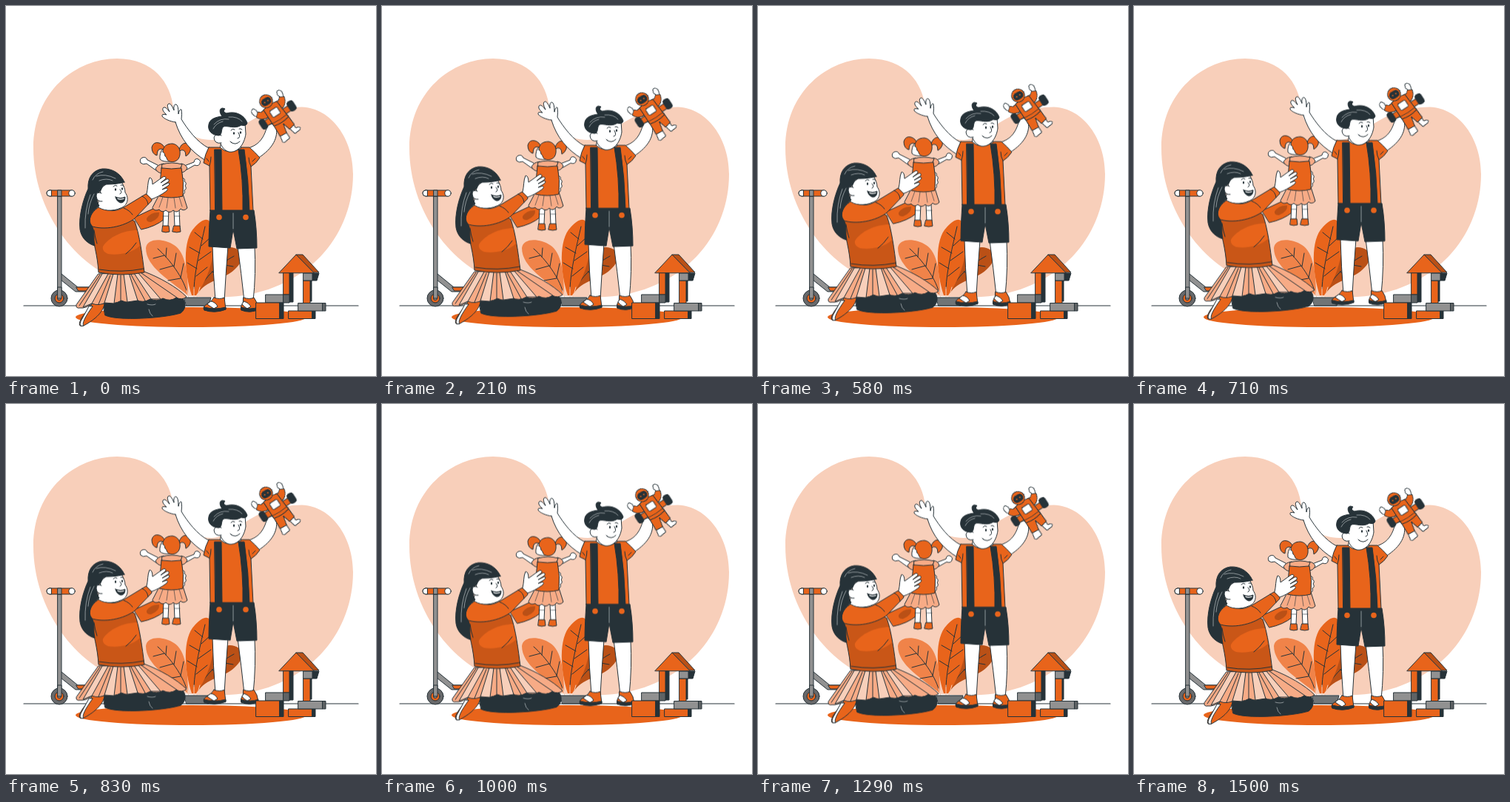
Animation, 500 px wide and 500 px high, one loop 1540 ms. Source, as an HTML page:

```html
<!DOCTYPE html>
<html lang="en">
<head>
<meta charset="utf-8">
<title>Children playing</title>
<style>
  html, body { margin: 0; width: 100%; height: 100%; overflow: hidden; background: #fff; }
  svg { display: block; width: 100vw; height: 100vh; }
  .art { stroke: #263238; stroke-width: 1; stroke-linejoin: round; stroke-linecap: round; fill: none; }
  .o { fill: #e8641b; }
  .s { fill: #ba5016; }
  .t { fill: #c95617; }
  .m { fill: #f08349; }
  .p { fill: #f7ab86; }
  .q { fill: #f8cfba; }
  .w { fill: #fff; }
  .d { fill: #263238; }
  .g { fill: #919191; }
  .n { stroke: none; }
  .k { fill: #263238; stroke: none; }
  .hl { stroke: #d5dadc; stroke-width: .6; }
  /* Linear bob of 10px, held at 24 steps per second */
  .float { animation: float 1540ms -5ms infinite; }
  @keyframes float {
    0% { transform: translateY(0); animation-timing-function: steps(17); }
    45.946% { transform: translateY(-9.4px); animation-timing-function: steps(18); }
    94.595% { transform: translateY(.6px); animation-timing-function: steps(2); }
    100% { transform: translateY(-.5px); }
  }
</style>
</head>
<body>
<svg viewBox="0 0 500 500">
  <path class="q" d="M150 71C199 71 223 104 226 138C229 166 252 181 278 181C312 179 330 137 400 136.500C440 138 469 180 469 227C469 306 414 376 322 391C268 398 210 390 165 375C92 354 37 275 37 192C37 115 95 71 150 71Z"/>

  <g class="art">
    <path d="M24 405H476" stroke-width="1.2"/>
    <ellipse class="o n" cx="250" cy="420.5" rx="156" ry="13.5"/>

    <g id="scooter">
      <path class="g" d="M75 362L97 380H118V386H94L74 370Z"/>
      <path class="o" d="M95 380H120V385H98Z"/>
      <path class="g" d="M70 257H75V388H70Z"/>
      <rect class="o" x="55" y="249" width="38" height="8" rx="4"/>
      <path class="w" d="M61 249H59A4 4 0 0 0 59 257H61Z"/>
      <path class="g" d="M70 249H75V257H70Z"/>
      <circle class="w" cx="89" cy="253" r="4.2"/>
      <circle cx="72" cy="395" r="11" fill="#68696b"/>
      <circle class="o" cx="72" cy="395" r="6"/>
      <circle class="g" cx="72" cy="395" r="2.5"/>
      <path class="g" d="M70 380H75V395H70Z"/>
    </g>

    <g id="plant">
      <path class="m n" d="M246 391C222 371 189 353 189 327C191 313 213 314 227 323C243 333 246 362 246 391Z"/>
      <path d="M205 328C222 343 239 367 244 385M216 339L217 327M227 352L230 334M236 367L240 348M214 337L199 341M226 351L208 356M236 368L219 371"/>
      <path class="s n" d="M259 389C263 355 276 328 302 326C322 327 324 343 309 356C293 371 270 370 259 389Z"/>
      <path d="M308 338C286 350 268 367 261 384M290 349L307 352M278 359L291 366"/>
      <path class="o n" d="M251 391C241 360 238 316 255 299C263 290 271 286 275 291C286 316 282 356 257 391Z"/>
      <path d="M269 298C263 324 255 357 254 382M266 315L255 306M262 334L248 326M258 355L245 347M264 324L276 313M260 344L277 332M257 365L272 353"/>
      <path d="M244 384L247 394M254 380V394M262 380L258 394" stroke="#f8cfba"/>
      <path d="M241 394H277L274 405H244Z" fill="#707476"/>
    </g>
  </g>

  <g class="art float" id="girl">
    <path class="d" d="M131 402C155 395 225 390 239 395C244 401 243 410 236 415C214 422 150 426 134 418Z"/>
    <path class="hl" d="M191 403Q198 405 202 403M193 410Q194 416 198 419"/>
    <path class="o" d="M117 402L133 402C132 412 122 423 105 432C97 435 98 427 104 419Z"/>
    <path class="w" d="M112 406L101 426Q98 434 105 432Q101 428 117 406Z"/>

    <path class="o" d="M173 286L205 271Q216 272 214 288Q202 298 183 302Z"/>
    <path class="s n" d="M190 287Q196 278 207 279Q208 287 196 292Q189 292 190 287Z"/>
    <path class="w" d="M237 232Q243 233 241 237Q245 239 242 243Q245 247 241 249Q243 254 237 256Z"/>

    <g id="doll">
      <path class="w" d="M213 275L212 298H219L220 275ZM227 275L228 298H235L234 275Z"/>
      <path class="o" d="M212 297H220L221 305Q216 307 211 305ZM227 297H235L236 305Q231 307 225 305Z"/>
      <path d="M212 284H219M228 284H235" stroke-width=".6"/>
      <path class="w" d="M205 215L191 208Q189 203 184 205Q180 207 182 212Q185 215 190 213L204 223ZM241 216L254 211Q255 205 260 207Q264 209 262 213Q260 217 255 215L241 223Z"/>
      <path class="p" d="M213 213Q205 214 202 220Q205 226 211 226ZM237 213Q243 214 245 219Q242 225 237 225Z"/>
      <path class="p" d="M208 254L239 254L245 273Q240 278 236 274Q231 281 226 276Q221 281 216 276Q211 280 207 275Q201 278 198 273Z"/>
      <path d="M212 258L207 272M219 259L217 273M227 259L229 273M234 258L238 271" stroke-width=".6"/>
      <path class="o" d="M210 219Q224 216 237 219Q241 237 239 257Q224 261 207 257Q208 238 210 219Z"/>
      <path class="p" d="M211 214Q224 210 238 214L236 219Q224 221 211 219Z"/>
      <path class="w" d="M212 193Q207 199 208 207Q212 211 221 210L219 195Z"/>
      <path class="o" d="M213 194Q204 190 204 202Q197 200 197 191Q199 183 207 185Q213 187 215 193ZM234 194Q236 186 243 185Q251 187 249 196Q247 201 243 203Q243 191 234 196Z"/>
      <path class="o" d="M212 197C212 189 218 186 225 186C232 187 236 193 235 201C234 209 227 212 221 210C216 208 218 204 215 203Q215 199 212 197Z"/>
    </g>

    <path class="p" d="M125 362L187 359C208 367 231 380 244 393Q238 398 230 394Q222 400 212 395Q204 400 195 396Q185 402 176 397Q166 403 156 398Q145 404 136 400Q126 406 116 402Q108 409 100 408Q94 409 95 404Z"/>
    <path class="q" d="M130 362L104 407L116 402L138 362ZM145 362L133 401L146 402L151 362ZM159 362L164 400L178 398L166 361ZM173 361L196 396L209 396L178 360Z"/>
    <path d="M183 361L231 394M127 363L99 405M141 364L125 403M155 364L155 399M169 363L188 398"/>

    <path class="t" d="M127 271C117 276 110 286 114 297C118 319 124 338 125 360Q156 366 187 360C184 337 181 311 174 291L151 278Z"/>
    <path class="o n" d="M131 325C139 312 159 303 177 303L181 324C169 335 149 337 138 335C133 333 130 330 131 325Z"/>
    <path d="M126 356Q156 361 186 355M176 320Q170 329 162 335M119 303Q120 312 123 321"/>
    <path class="o" d="M127 271C139 279 149 278 161 271L189 254Q197 255 197 263L174 287C160 298 132 304 114 297C110 287 117 276 127 271Z"/>
    <path d="M159 273Q167 276 171 282M184 257Q191 260 192 268"/>
    <path class="w" d="M190 254C192 247 191 238 194 232Q198 232 198 241L212 231Q216 229 216 233L209 239L217 234Q221 233 220 237L211 243L219 239Q223 239 219 243L211 248L217 246Q220 247 217 250C210 255 203 259 197 261Z"/>

    <path class="w" d="M128 249C130 240 146 236 157 239C159 244 161 247 161 252C167 260 164 270 155 273C144 278 130 277 124 271Z"/>
    <path class="d" d="M160 238C155 226 143 219 130 220C117 222 110 232 111 247C104 262 98 284 100 302C102 315 112 322 120 324C117 313 122 304 114 294C111 285 118 275 126 270C121 263 123 253 128 249C130 244 133 240 137 241C146 241 153 240 160 238Z"/>
    <path class="hl" d="M117 235Q121 226 131 224M114 255Q106 276 107 300M119 254Q112 267 111 281M122 230Q134 226 148 233M126 236Q136 232 144 236"/>
    <path class="w" d="M129 253Q122 250 122 257Q123 265 130 264"/>
    <ellipse class="k" cx="148" cy="248" rx="1.2" ry="1.8"/>
    <ellipse class="k" cx="157" cy="247" rx="1.1" ry="1.8"/>
    <path d="M145 244Q147 241 150 243M155 242Q157 241 159 243M154 248Q158 252 154 254"/>
    <path class="d" d="M148 258Q155 261 161 258Q161 266 155 266Q149 264 148 258Z"/>
    <path class="w n" d="M150 259.500Q155 261.500 160 259.500L159 261Q154 262.500 151 261Z"/>
  </g>

  <g class="art float" id="boy">
    <path class="w" d="M279 324Q280 362 283 399H295Q297 362 300 324ZM313 324Q318 362 322 399H334Q338 362 336 324Z"/>
    <path class="o" d="M281 394Q289 397 295 394L297 410Q283 415 268 411Q265 407 271 403Q278 400 281 394ZM321 394Q329 397 335 394Q340 400 341 410Q332 415 318 411Q316 406 320 402Z"/>
    <path class="w" d="M277 399Q283 400 286 406L281 409Q276 406 272 403ZM322 399Q328 401 331 406L326 409Q321 406 319 403Z"/>
    <path class="d" d="M268 407Q282 411 297 407V410Q282 416 268 411ZM318 407Q330 411 341 407V410Q330 416 318 411Z"/>

    <path class="w" d="M229 157C221 156 213 152 211 149Q210 145 217 147Q209 140 213 137Q216 136 221 143Q216 133 220 132Q223 131 227 141Q226 132 230 133Q233 134 233 146Q234 139 237 140Q238 146 237 153C245 166 258 184 274 192L270 209C250 197 236 180 229 157Z"/>
    <path class="w" d="M324 193C340 189 348 181 353 162Q359 157 365 162C368 177 362 192 340 206Z"/>
    <path class="w" d="M291 182L289 194Q301 206 318 194L317 182Z"/>
    <path class="o" d="M274 191L289 191Q302 203 319 191L329 191Q337 198 343 205Q338 213 331 217L334 277H276L275 216L267 212Q269 200 274 191Z"/>
    <path d="M275 216Q277 210 277 204M331 217Q328 211 328 205M271 206L274 210M337 206L333 210"/>
    <path class="d" d="M282 194L291 194L292 278H283ZM314 194L322 194Q328 235 329 278H320Q321 235 314 194Z"/>
    <path class="d" d="M276 276H335C338 294 339 311 339 327L312 328L307 302L303 327L274 325C274 308 275 291 276 276Z"/>
    <path class="hl" d="M307 280V301"/>
    <circle class="o n" cx="288" cy="285.500" r="3.800"/>
    <circle class="o n" cx="324" cy="285.500" r="3.800"/>

    <path class="w" d="M289 162C286 178 289 193 301 197C313 199 322 187 324 173L323 158H291Z"/>
    <path class="w" d="M291 175Q283 171 281 178Q282 187 291 185"/>
    <path class="d" d="M292 149C288 144 288 138 293 138L296 139Q292 143 298 145C312 141 323 149 326 158Q325 163 318 161C309 167 299 161 294 163C290 166 293 173 288 175C278 175 272 168 274 160C275 153 283 150 292 149Z"/>
    <path class="hl" d="M281 160Q289 151 301 153M280 166Q284 158 293 156M301 150Q313 149 319 156"/>
    <ellipse class="k" cx="308" cy="172" rx="1.200" ry="1.800"/>
    <ellipse class="k" cx="317" cy="171" rx="1.200" ry="1.800"/>
    <path d="M304 168Q306 165 309 167M315 166Q317 165 319 167M314 171Q318 178 313 179M304 184Q310 189 316 183M303 183L305 185"/>

    <g id="robot" transform="translate(364 148) rotate(-33)">
      <path class="o" d="M-17 -2H24V6H-17Z"/>
      <rect class="d" x="-24" y="-6" width="8" height="14" rx="3"/>
      <rect class="d" x="21" y="-6" width="9" height="14" rx="3"/>
      <path class="w" d="M-9 24L-11 34Q-12 38 -7 37L0 36L0 24ZM6 23L9 35L18 34Q21 32 18 30L14 29L14 22Z"/>
      <path class="o" d="M-9 8L-10 27L0 28L3 15L6 26L15 24L14 8Z"/>
      <path class="w" d="M-15 -13L-18 -15Q-17 -21 -20 -24Q-25 -24 -25 -19Q-25 -14 -20 -10ZM17 -14L19 -17Q16 -22 19 -26Q24 -28 25 -22Q24 -17 22 -12Z"/>
      <path class="o" d="M-8 -15L-14 -14L-17 -17L-23 -12Q-19 -3 -8 -3ZM10 -15L15 -15L18 -18L24 -15Q21 -3 11 -3Z"/>
      <path class="o" d="M-9 -15Q2 -18 12 -15L14 11Q2 14 -9 11Z"/>
      <rect class="w" x="-4" y="-9" width="12" height="10" rx="1.500"/>
      <path d="M-9 7Q2 9 14 7" stroke-width=".7"/>
      <circle class="o" cx="0" cy="-23" r="9"/>
      <rect class="d" x="-6.500" y="-27" width="13" height="9" rx="4"/>
      <circle class="o n" cx="-2.500" cy="-22.500" r="1"/>
      <circle class="o n" cx="2.500" cy="-22.500" r="1"/>
    </g>
  </g>

  <g class="art" id="blocks">
    <path class="d" d="M383 360H388V400H383ZM411 361H423L420 371H413V399H411Z"/>
    <path class="o" d="M402 371H411V402H402ZM375 360H383V390H375Z"/>
    <path class="g" d="M402 361H414V371H402Z"/>
    <path class="s" d="M392 336H401L423 360H416Z"/>
    <path class="o" d="M369 360.500L392 336L416 360.500Z"/>
    <path class="g" d="M351 390H375V401H351Z"/>
    <path d="M375 390H383V401H375Z" fill="#5f6365"/>
    <path class="o" d="M338 401H370V422.500H338Z"/>
    <path class="d" d="M370 401H375V422.500H370Z"/>
    <path class="o" d="M382 412H414V422.500H382Z"/>
    <path class="d" d="M414 412H418V422.500H414Z"/>
    <path class="g" d="M395 401.500H428V412H395Z"/>
    <path d="M428 401.500H432V412H428Z" fill="#5f6365"/>
  </g>
</svg>
</body>
</html>
```
